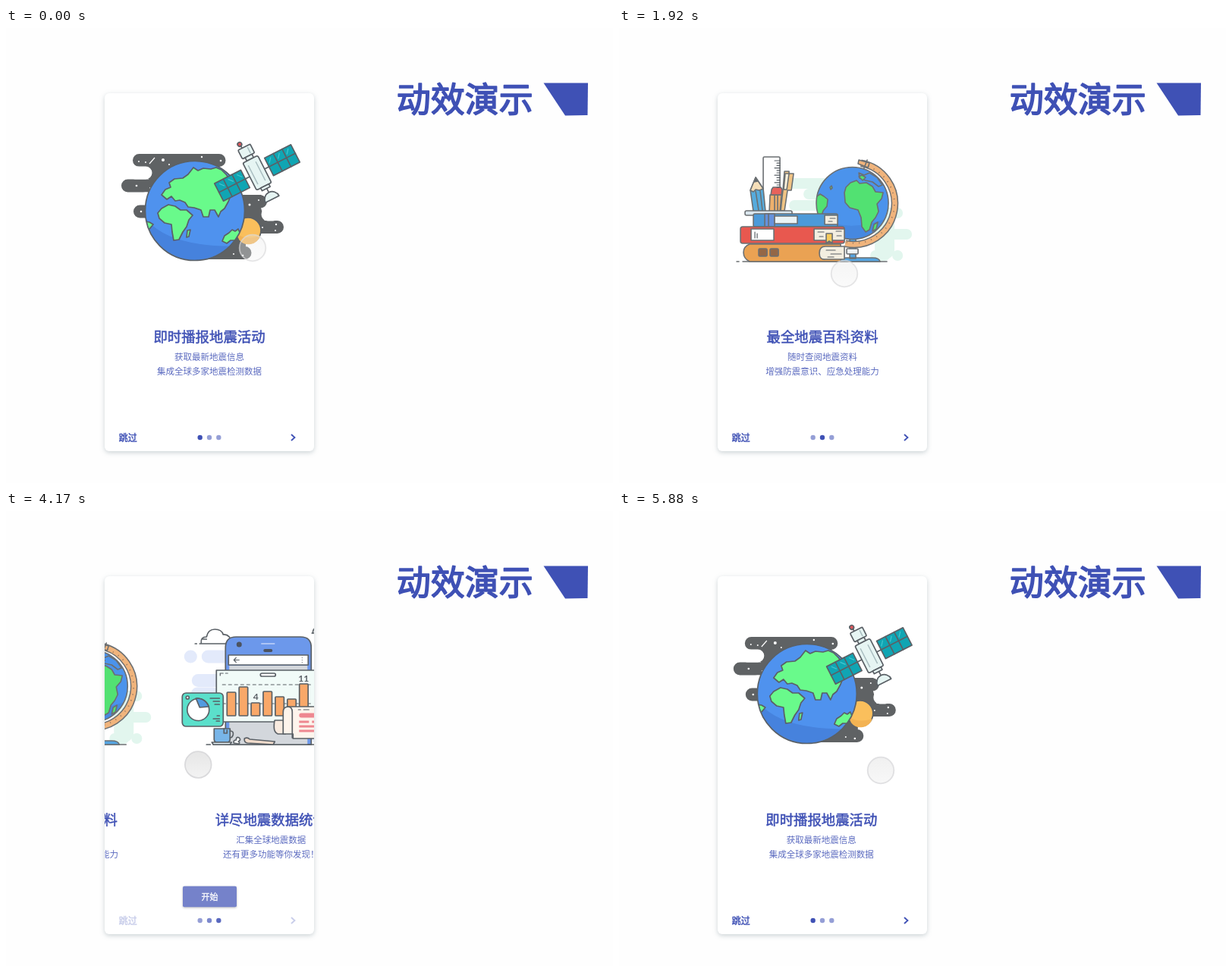
An HTML page for the animation above (6750 ms loop, 800 px wide and 600 px high).

```html
<!DOCTYPE html>
<html lang="zh-CN">
<head>
<meta charset="utf-8">
<title>动效演示</title>
<style>
html, body { margin: 0; width: 100%; height: 100%; overflow: hidden; background: #fefefe; }
svg { display: block; width: 800px; height: 600px; }
text { font-family: "Noto Sans CJK SC", "Noto Sans CJK", "Noto Sans", sans-serif; fill: #3f51b5; }
.medium { stroke: #3f51b5; stroke-linejoin: round; }
.h { font-size: 18.4px; text-anchor: middle; stroke: #3f51b5; stroke-width: .5; }
.s { font-size: 11.5px; text-anchor: middle; opacity: .85; }
.num { font-family: Lato, "Open Sans", sans-serif; font-weight: 700; fill: #5a6066; text-anchor: middle; }
.card { fill: #fff; filter: drop-shadow(0 2px 3px rgba(60, 90, 100, .26)); }
.ink { stroke: #5a6066; stroke-width: 1.7; stroke-linejoin: round; stroke-linecap: round; }
.soft .ink { stroke: #6b6f72; stroke-width: 1.6; }
.thin { stroke: #5a6066; stroke-width: 1.2; stroke-linecap: round; fill: none; }
.line { fill: none; }
.cream { fill: #f3eee0; }
.white { fill: #fff; }
.mint { stroke: #e2f6ee; stroke-linecap: round; fill: none; }
.sky { stroke: #e3eafb; stroke-linecap: round; fill: none; }
.space { stroke: #5f6264; stroke-linecap: round; stroke-width: 17; fill: none; }
</style>
</head>
<body>
<svg viewBox="0 0 800 600">
  <defs>
    <clipPath id="cardClip"><rect x="130" y="86" width="276" height="472" rx="6"/></clipPath>
    <clipPath id="earthClip"><circle cx="249" cy="241" r="65"/></clipPath>
    <clipPath id="globeClip"><circle cx="307.5" cy="231" r="47.5"/></clipPath>
    <linearGradient id="knob" x1="0" y1="0" x2="0" y2="1">
      <stop offset="0" stop-color="#e6e6e6"/><stop offset="1" stop-color="#f3f3f3"/>
    </linearGradient>
    <g id="panel">
      <rect class="ink" x="17.5" y="-13" width="39" height="26" fill="#10a5b3"/>
      <path class="ink" d="M30.5-13v26M43.5-13v26M17.5 0h39"/>
      <path d="M20-4l5-6M33-4l5-6M46-4l5-6" stroke="#46c6cf" stroke-width="1.2"/>
    </g>
  </defs>

  <text class="medium" x="514.700" y="111" font-size="45" stroke-width="1.700">动效演示</text>
  <path d="M708.500 72.500H767L766.500 115L737 115.500Z" fill="#3f51b5"/>
  <rect class="card" x="130" y="86" width="276" height="472" rx="6"/>

  <g clip-path="url(#cardClip)">
    <g class="page">
      <path class="space" d="M175.500 174.500H281M160.500 208H250M176.500 242H250M290 229H335.500M300 262.500H357.500M255 296.500H315"/>
      <path d="M187 180h80l40 40h30q-6 10-1 17l5 18h-25v48h-66l-60-52v-17h-1q6-9 0-18h-5q12-8 3-18z" fill="#5f6264"/>
      <path d="M170 191h14M184 225h1M352 246h-7" stroke="#fff" stroke-width="17" stroke-linecap="round"/>
      <path d="M189 179l7-8" stroke="#fff" stroke-width="1.200"/>
      <g id="stars" fill="#fff"></g>
      <circle class="ink" cx="319" cy="267" r="17" fill="#fabf5c"/>
      <path d="M305 272q12 8 30 2a16 16 0 0 1-28 5z" fill="#f3b353"/>
      <circle cx="249" cy="241" r="65.500" fill="#4f92ee"/>
      <g clip-path="url(#earthClip)">
        <path d="M182 248Q212 292 318 287V310H182Z" fill="#4682dd"/>
        <g class="ink" fill="#69fa8b">
          <polygon points="205,220 210,213 217,210 215,204 222,199 233,198 240,193 247,184 253,188 260,185 270,186 277,184 284,187 290,193 297,202 299,214 293,229 288,238 283,242 280,249 275,240 269,240 267,249 260,249 257,240 248,237 240,236 236,230 229,227 223,228 218,222 212,226"/>
          <polygon points="200,244 205,238 214,233 223,235 230,240 238,240 246,247 241,253 238,262 233,269 228,279 221,280 219,269 218,259 209,257 202,251"/>
          <polygon points="239,267 243,266 241,275 238,276"/>
          <polygon points="181,255 189,256 194,259 190,264 186,267 182,264"/>
          <polygon points="285,281 288,274 294,270 298,266 302,268 306,265 309,272 304,280 296,280 291,284"/>
        </g>
      </g>
      <circle class="ink line" cx="249" cy="241" r="65.500"/>
      <g transform="translate(331 191) rotate(-27)">
        <path class="ink" d="M-18 0h36M-3-24v-18M2 20v10" stroke-width="3"/>
        <use href="#panel"/>
        <use href="#panel" transform="scale(-1 1)"/>
        <g class="ink" fill="#e6f5f3">
          <rect x="-9" y="-38" width="18" height="13" rx="1.500"/>
          <rect x="-5" y="-25" width="10" height="5"/>
          <rect x="-11" y="-20" width="22" height="40" rx="2"/>
          <path d="M-5 20h12v4h-12zM-8 40A10 10 0 0 1 12 40Z"/>
        </g>
        <path d="M-6-14v28M5-14v28M4-36v9" stroke="#a9bdc0" stroke-width="1.500"/>
        <circle class="ink" cx="-3.500" cy="-44" r="2.800" fill="#e0565b" stroke-width="1.200"/>
      </g>
      <text class="h" x="268" y="413.500">即时播报地震活动</text>
      <text class="s" x="268" y="438">获取最新地震信息</text>
      <text class="s" x="268" y="456.500">集成全球多家地震检测数据</text>
    </g>

    <g class="page soft">
      <path class="mint" stroke-width="14" d="M229 205H270M250 219H275M231 234H262M340 244H367M345 272H379M338 300H350M367 300h.1"/>
      <path class="mint" stroke-width="26" d="M350 250V292"/>
      <path class="ink" d="M155 308h3M163 308H353"/>
      <path class="ink" d="M304 278h8v26h-8zM290 308q2-5 10-5h34q9 0 10 5z" fill="#55a5e2"/>
      <rect class="ink" x="300" y="291" width="15" height="7" rx="1" fill="#eef3f5"/>
      <g fill="none">
        <path d="M318.700 178.200A54 54 0 1 1 298.100 284.200" stroke="#6b6f72" stroke-width="9.600"/>
        <path d="M318.700 178.200A54 54 0 1 1 298.100 284.200" stroke="#f0b47c" stroke-width="6.600"/>
        <path d="M320 180.500A52 52 0 1 1 298.500 282.200" stroke="#a27f63" stroke-width="2" stroke-dasharray="1.200 7"/>
      </g>
      <path class="ink" d="M316 174l14 4-2 6-13-5z" fill="#f0b47c"/>
      <path class="ink" d="M327 174l-5 13" stroke-width="2.500"/>
      <circle cx="307.500" cy="231" r="47.500" fill="#4b93ec"/>
      <g clip-path="url(#globeClip)">
        <path d="M258 240q30 34 92 12v32h-92z" fill="#4688e0"/>
        <g class="ink" fill="#52e172">
          <polygon points="297,217 299,210 305,204 313,201 317,205 326,204 334,209 338,216 348,217 346,225 340,232 342,242 338,250 333,256 330,266 325,269 320,262 319,250 315,240 304,237 298,230"/>
          <polygon points="316,191 323,194 330,191 340,197 347,207 342,209 334,203 325,201 317,198" fill="#4b93ec"/>
          <polygon points="316,196 320,194 325,197 321,201"/>
          <polygon points="258,224 265,219 270,222 275,226 274,235 269,241 266,250 259,246"/>
          <polygon points="278,210 280,208 281,211 279,213"/>
          <polygon points="336,259 341,256 339,265 334,268"/>
        </g>
      </g>
      <circle class="ink line" cx="307.500" cy="231" r="47.500"/>
      <g class="ink">
        <rect class="white" x="190" y="170" width="22" height="74" rx="1.500"/>
        <path d="M218 189h6v3h6l-3 22h-5l-4 27h-5l3-28z" fill="#f0c384"/>
        <path d="M224 192l-3 21h-4l2-21z" fill="#fff2dc"/>
        <path d="M199 220h15l-2 22h-14z" fill="#eeb06c"/>
        <path d="M203 210h10l2 3-1 7h-14l1-7z" fill="#e8625b"/>
        <path d="M205 221v20M209 221v20"/>
        <path d="M173 214l7-17 10 15 3 30h-16z" fill="#56abdd"/>
        <path d="M173 214l7-17 10 15-5 2-5-1-3 3z" fill="#f6dfb9"/>
        <path d="M180 198l-2 5 5-1z" fill="#5a6066"/>
        <path d="M180 215l4 26M186 215l3 26"/>
        <rect x="166" y="241" width="62" height="6" rx="2" fill="#dbe7ef"/>
        <rect x="177" y="245" width="111" height="17" rx="2" fill="#4c9ad9"/>
        <path d="M192 245h13v17h-13z" fill="#6592dc"/>
        <path d="M197 245v17"/>
        <rect x="205" y="248" width="30" height="10" fill="#eaf3f5"/>
        <path class="cream" d="M271 247h17v12h-17z"/>
        <rect x="160" y="262" width="137" height="22" rx="3" fill="#e8584f"/>
        <rect class="white" x="174" y="265" width="30" height="15"/>
        <path class="cream" d="M257 265h40v15h-40z"/>
        <path d="M273 271h8v13l-4-3-4 3z" fill="#f6cb5c"/>
        <path d="M172 285H292V308H172Q164 304 164 296T172 285Z" fill="#eaa253"/>
        <path class="cream" d="M297 288H272q-8 0-8 9t8 8h25z"/>
        <rect x="184" y="291" width="11" height="10" rx="1.500" fill="#956746"/>
        <rect x="199" y="291" width="11" height="10" rx="1.500" fill="#956746"/>
      </g>
      <path class="thin" d="M278 251h7M276 255h5M262 269h8M286 268h7M264 275h5M287 274h6M273 293h12M279 298h14M275 302h8M179 269v8M182 271v6"/>
      <path class="thin" id="ticks"/>
      <text class="h" x="268" y="413.500">最全地震百科资料</text>
      <text class="s" x="268" y="438">随时查阅地震资料</text>
      <text class="s" x="268" y="456.500">增强防震意识、应急处理能力</text>
    </g>

    <g class="page">
      <g transform="translate(-5 0)">
        <path class="sky" stroke-width="17" d="M167 192h.1M190 192H215M177 223.500H230M176 241h20M387 235h.1M330 236H368M330 267H374M335 299H359"/>
        <path class="sky" stroke-width="24" d="M340 240V290"/>
        <path class="ink white" d="M181 174q-1-8 7-8q2-10 11-10q9 0 11 7q9-1 12 12"/>
        <path class="ink" d="M173 175h2M179 175H222M183 169h5"/>
        <path class="ink white" d="M328 161q0-7 7-8q2-7 9-7q7 0 9 7q8-1 8 4"/>
        <path class="ink" d="M327 161H359M363 161h4M355 157h9"/>
        <path class="ink" d="M213 308V180q0-14 14-14H312q14 0 14 14V308z" fill="#6c98eb"/>
        <path d="M218 204h103v104H218z" fill="#d3d7dc"/>
        <rect class="ink white" x="217" y="190" width="105" height="13" stroke-width="1.200"/>
        <path class="thin" d="M224 196.500h7M224 196.500l3-3M224 196.500l3 3M314 193.500v.1M314 196.500v.1M314 199.500v.1" stroke-width="1.500"/>
        <circle cx="231" cy="176" r="3.500" fill="#4c5360"/>
        <path d="M260 175h18" stroke="#c3d5fa" stroke-width="1.500"/>
        <rect x="263" y="182" width="12" height="4" rx="2" fill="#4c5360"/>
        <path class="ink" d="M201 210H335V278H201z" fill="#f1fbf8"/>
        <rect class="ink white" x="259" y="214" width="20" height="4" rx="2"/>
        <path class="thin" d="M206 217v-3h4M213 214h3"/>
        <path class="thin" d="M209 229H329M209 254H329" stroke-dasharray="4 4"/>
        <g id="bars" class="ink" fill="#f9a869"></g>
        <text class="num" x="253" y="249" font-size="12">4</text>
        <text class="num" x="316" y="225" font-size="12">11</text>
        <path class="ink white" d="M334 189H376q4 0 4 4V217q0 4-4 4H341l-6 6v-6h-1q-3 0-3-4V193q0-4 3-4z"/>
        <path class="ink" d="M344.500 215q-7-8-7-13a7 7 0 0 1 14 0q0 5-7 13z" fill="#35dd91"/>
        <circle class="ink white" cx="344.500" cy="202" r="2.500" stroke-width="1"/>
        <path class="thin" d="M356 196h8M356 199h5M340 216h9"/>
        <text class="num" x="363.500" y="214" font-size="15.500">32</text>
        <rect class="ink" x="156" y="240" width="54" height="44" rx="5" fill="#5be0cb"/>
        <circle class="ink white" cx="177" cy="262" r="14.500"/>
        <path class="ink" d="M179 259L174 247q12-1 17 11z" fill="#529be0"/>
        <circle class="ink white" cx="163" cy="246" r="2" stroke-width="1.200"/>
        <path class="ink" d="M193 247h12M197 251h8M199 255h6M202 270h3M197 274h8M201 277h4"/>
        <path class="ink" d="M278 276H292V294H282q-5-2-5-9t1-9z" fill="#f8eadf"/>
        <path class="ink" d="M296 258H352q2 0 2 3V297q0 3-3 3H302V294H289V265q0-7 7-7z" fill="#fdf4ec"/>
        <path class="ink line" d="M301 299V265q0-7-6-7"/>
        <path class="thin" d="M309 262h3M316 262h7M350 288v8h-5"/>
        <path d="M313 269.500h22M342 269.500h.1" stroke="#ee8790" stroke-width="6" stroke-linecap="round"/>
        <path d="M310 278h13M327 278h7M310 284h22M336 284h5M310 290h25" stroke="#ee8790" stroke-width="3"/>
        <path class="ink" d="M188 308h5M197 308H358M363 308h4"/>
        <path class="ink" d="M198 287H219V301q0 4-4 4H202q-4 0-4-4z" fill="#78b5e8"/>
        <path class="ink line" d="M219 290q5 0 4 5q-1 4-4 4M211 287v6h4v-4"/>
        <path class="ink" d="M195 305H221l-2 3H197z" fill="#e6f0f5"/>
        <path class="ink white" d="M224 306q-1-4 3-4q0-5 4-3q3 3-1 5q3 2 0 3z" stroke-width="1.200"/>
        <path class="ink" d="M238 300q4-2 7 1L278 304l-2 4L242 306q-5-1-4-6z" fill="#f1dccc"/>
      </g>
      <text class="h" x="268" y="413.500">详尽地震数据统计</text>
      <text class="s" x="268" y="438">汇集全球地震数据</text>
      <text class="s" x="268" y="456.500">还有更多功能等你发现！</text>
    </g>

    <g id="nav">
      <text class="medium" x="148.700" y="544.500" font-size="12" stroke-width=".450">跳过</text>
      <path d="M376 536l4.500 4-4.500 4" fill="none" stroke="#3f51b5" stroke-width="1.800"/>
    </g>
    <g id="start">
      <rect x="233" y="491" width="71" height="27.500" rx="2" fill="#3f51b5" style="filter:drop-shadow(0 1px 1.5px rgba(0,0,0,.35))"/>
      <text x="268.500" y="509" font-size="11" text-anchor="middle" style="fill:#fff;stroke:#fff;stroke-width:.3">开始</text>
    </g>
    <g fill="#3f51b5">
      <circle class="dot" cx="255.700" cy="540" r="3.200"/>
      <circle class="dot" cx="268" cy="540" r="3.200"/>
      <circle class="dot" cx="280.300" cy="540" r="3.200"/>
    </g>
    <circle id="touch" r="17.300" fill="url(#knob)" stroke="#dadadc" stroke-width="1.800"/>
  </g>
</svg>
<script>
const LOOP = 6750, END = 5880, STEP = 30;
const WIDTH = 276, PULL = 160, DRAG = 300, SETTLE = 600;
const $ = id => document.getElementById(id);
const all = sel => [...document.querySelectorAll(sel)];
const clamp = v => Math.min(1, Math.max(0, v));

const ease = {
  smooth: u => u * u * (3 - 2 * u),
  pull: u => u ** 1.5,
  out: u => 1 - (1 - u) ** 3
};

// start time and page direction of each swipe
const swipes = [[1075, 1], [2250, 1], [3979, -1], [5110, -1]];

// time, x, y, fill opacity, easing towards the next key
const keys = [
  [0, 325, 290, .35, "smooth"],
  [690, 341, 323, .5, "smooth"],
  [900, 339, 323, 1, "smooth"],
  [1075, 339, 323, 1, "pull"],
  [1375, 179, 323, 1, "out"],
  [1560, 160, 323, .6, "smooth"],
  [1920, 297, 324, .4, "out"],
  [2130, 318, 328, 1, "smooth"],
  [2250, 318, 329, 1, "pull"],
  [2550, 158, 332, 1, "out"],
  [2940, 137, 333, .9, "smooth"],
  [3420, 168, 333, .5, "smooth"],
  [3800, 172, 333, 1, "smooth"],
  [3979, 172, 334, 1, "pull"],
  [4279, 332, 335, 1, "out"],
  [4430, 344, 336, .6, "smooth"],
  [4740, 236, 338, .5, "out"],
  [5000, 177, 340, 1, "smooth"],
  [5110, 177, 341, 1, "pull"],
  [5410, 337, 342, 1, "out"],
  [END, 345, 342, .6, "smooth"]
];

function pageAt(t) {
  let px = 0;
  for (const [start, dir] of swipes) {
    const pull = ease.pull(clamp((t - start) / DRAG));
    const settle = ease.out(clamp((t - start - DRAG) / SETTLE));
    px += dir * (PULL * pull + (WIDTH - PULL) * settle);
  }
  return px / WIDTH;
}

function touchAt(t) {
  let i = 0;
  while (i < keys.length - 2 && t >= keys[i + 1][0]) i++;
  const a = keys[i], b = keys[i + 1];
  const u = ease[a[4]](clamp((t - a[0]) / (b[0] - a[0])));
  return [1, 2, 3].map(k => a[k] + (b[k] - a[k]) * u);
}

const stars = [[175, 176, 1], [184, 177, 1], [207, 174, 2], [215, 180, 1], [258, 170, 1.2], [283, 175, 1.3],
  [172, 208, 1.3], [190, 211, 1], [178, 242, 1.3], [321, 233, 1.5], [333, 227, 1], [338, 263, 1],
  [356, 259, 1.2], [355, 267, 1], [300, 298, 1], [312, 300, 1.3]];
$("stars").innerHTML = stars.map(([x, y, r]) => `<circle cx="${x}" cy="${y}" r="${r}"/>`).join("");
$("bars").innerHTML = [239, 232, 253, 238, 245, 248, 228].map((y, i) =>
  `<rect x="${215 + i * 15.9}" y="${y}" width="11.5" height="${270 - y}" rx="1"/>`).join("");
$("ticks").setAttribute("d", Array.from({ length: 12 }, (_, i) =>
  `M212 ${175 + i * 3.2}h${i % 3 ? -4 : -7}`).join(""));

const pages = all(".page"), dots = all(".dot");

function draw(time) {
  const t = Math.min(END, Math.floor((time % LOOP) / STEP) * STEP);
  const p = pageAt(t), last = clamp((p - 1.02) / .96);
  pages.forEach((g, i) => g.setAttribute("transform", `translate(${((i - p) * WIDTH).toFixed(2)} 0)`));
  dots.forEach((d, i) => d.setAttribute("opacity", .55 + .45 * clamp(1 - Math.abs(p - i))));
  $("nav").setAttribute("opacity", 1 - last);
  $("start").setAttribute("opacity", last);
  $("start").setAttribute("transform", `translate(0 ${(1 - last) * 13})`);
  const [x, y, a] = touchAt(t);
  $("touch").setAttribute("cx", x);
  $("touch").setAttribute("cy", y);
  $("touch").setAttribute("fill-opacity", a);
  $("touch").setAttribute("stroke-opacity", .5 + a / 2);
}

const t0 = performance.now();
function tick() {
  draw(performance.now() - t0);
  requestAnimationFrame(tick);
}
tick();
</script>
</body>
</html>
```
